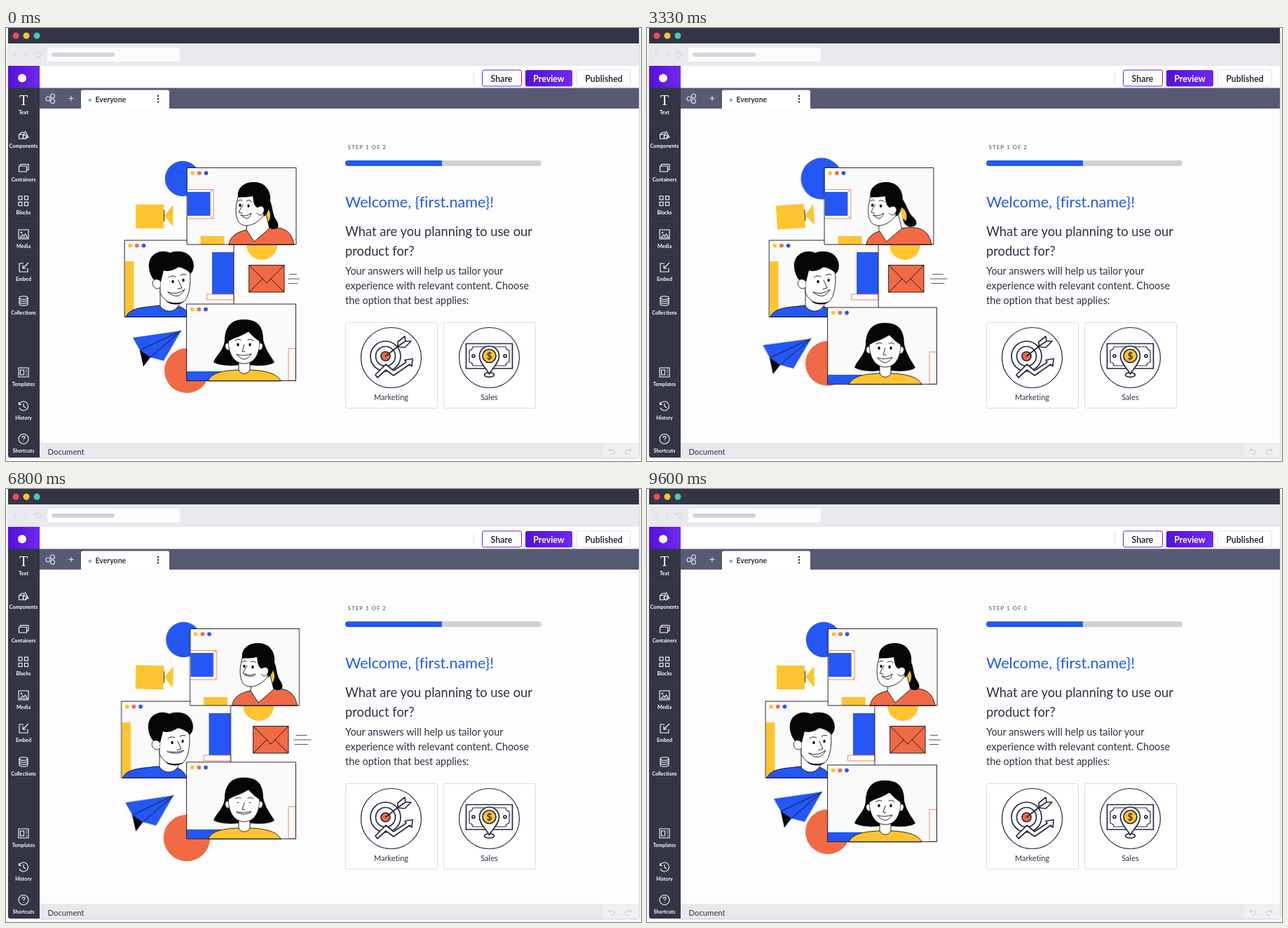
These frames come from a looping animation (906x618 px, 9660 ms). An HTML page:

```html
<!DOCTYPE html>
<html lang="en">
<head>
<meta charset="utf-8">
<title>Onboarding survey</title>
<style>
html, body { margin: 0; width: 100%; height: 100%; overflow: hidden; background: #fff; }
svg { display: block; width: 906px; height: 618px; font-family: Lato, sans-serif; font-variant-ligatures: none; fill: none; }
text { fill: #2f3142; }
.b { font-weight: 700; }
.mid { text-anchor: middle; }
.side text { fill: #fff; font-size: 7.2px; font-weight: 700; text-anchor: middle; }
.icon { stroke: #fff; stroke-width: 1.1; }
.k { stroke: #111; stroke-width: .9; stroke-linejoin: round; stroke-linecap: round; }
.w { fill: #fff; }
.blk { fill: #060608; }
.blue { fill: #2457f3; }
.yel { fill: #ffc42f; }
.red { fill: #f16a46; }
.thin { stroke: #f16a46; stroke-width: .8; }
.ink { stroke: #262a40; stroke-width: 1.7; stroke-linejoin: round; stroke-linecap: round; }

/* --u is the shared sway that drives the three windows and the red disc. */
@property --u { syntax: "<number>"; inherits: true; initial-value: 0; }
.sway, .move { animation: 4830ms cubic-bezier(.37, 0, .63, 1) infinite; }
.sway { animation-name: sway; }
#topWin { transform: translateX(calc(var(--u) * 1px)); }
#leftWin { transform: translateX(calc(var(--u) * -1px)); }
#lowWin { transform: translateY(calc(var(--u) * -.95px)); }
#redDot { transform: translateY(calc(var(--u) * 2px)); r: calc((32 + max(0, var(--u) - 2) * .5) * 1px); }
#hair { transform-box: fill-box; transform-origin: top; transform: scaleY(calc(1 + max(0, 0 - var(--u)) * .009)); }

#blueDot { animation-name: drift; }
#blueDot circle { animation: pulse 2415ms cubic-bezier(.37, 0, .63, 1) infinite; }
#yellowDot { animation-name: slide; }
#plane { animation-name: fly; }
#mail { animation-name: mail; }
#speed { animation-name: speed; transform-origin: 419px 358px; }
#speed path { vector-effect: non-scaling-stroke; }
#camera { animation-name: tilt; transform-origin: 211px 269px; }
#lady { animation-name: lady; }
#tail { animation-name: tail; transform-origin: 371px 242px; }
#man { animation-name: man; }
.mouth { animation-name: mouth; transform-box: fill-box; transform-origin: top; vector-effect: non-scaling-stroke; }
.eyes { animation-name: blink; transform-box: fill-box; transform-origin: center; }
#lowWin .eyes { animation-name: blink2; }

@keyframes sway { 0%, 3%, 100% { --u: 0; } 31% { --u: 6.2; } 69% { --u: -5.1; } 92% { --u: 1.4; } }
@keyframes drift { 0%, 100% { transform: translateX(252px); } 25% { transform: translateX(250.5px); } 56% { transform: translateX(256px); } 72% { transform: translateX(248.5px); } }
@keyframes pulse { 0%, 15%, 60%, 100% { r: 25.2px; } 40% { r: 29.7px; } }
@keyframes slide { 0%, 100% { transform: translateX(365px); } 26% { transform: translateX(369px); } 51% { transform: translateX(355.5px); } 75% { transform: translateX(370px); } }
@keyframes fly {
  0%, 100% { transform: translate(250px, 432px); }
  29% { transform: translate(238px, 436px) rotate(-1.5deg); }
  57% { transform: translate(241px, 439.5px) rotate(2deg); }
  76% { transform: translate(231.5px, 445px); }
}
@keyframes mail { 0%, 100% { transform: none; } 10% { transform: translateX(-1.5px); } 42% { transform: translateX(6px); } 61% { transform: translateX(-4.5px); } 80% { transform: translateX(2.2px); } }
@keyframes speed {
  0%, 100% { transform: translateX(0) scaleX(1); }
  22% { transform: translateX(2px) scaleX(1.3); }
  43% { transform: translateX(17px) scaleX(1.5); }
  65% { transform: translateX(8px) scaleX(1.5); }
  77% { transform: translateX(14.5px) scaleX(1.3); }
}
@keyframes tilt { 0%, 37%, 100% { transform: rotate(0deg); } 47% { transform: rotate(4.5deg); } 70% { transform: rotate(-4deg); } }
@keyframes lady { 0%, 10%, 100% { transform: translateX(0); } 42% { transform: translateX(1.5px); } 66% { transform: translateX(-7.5px); } }
@keyframes tail { 0%, 42%, 100% { transform: rotate(0deg); } 66% { transform: rotate(-13deg); } }
@keyframes man { 0%, 10%, 100% { transform: translateX(0); } 41% { transform: translateX(3.5px); } 62% { transform: translateX(1px); } }
@keyframes mouth { 0%, 12%, 60%, 100% { transform: scaleY(1); } 35%, 47% { transform: scaleY(.45); } }
@keyframes blink { 0%, 7%, 11.5%, 100% { transform: scaleY(1); } 8%, 10.5% { transform: scaleY(.25); } }
@keyframes blink2 { 0%, 7%, 11.5%, 39%, 43%, 100% { transform: scaleY(1); } 8%, 10.5%, 40%, 42% { transform: scaleY(.25); } }
</style>
</head>
<body>
<svg viewBox="0 0 906 618">
  <defs>
    <linearGradient id="violet" x2="1"><stop stop-color="#5410dc"/><stop offset="1" stop-color="#7029ee"/></linearGradient>
    <filter id="soft" x="-5%" y="-5%" width="110%" height="110%"><feGaussianBlur stdDeviation="1.6"/></filter>
    <g id="pane">
      <rect width="155.5" height="109.5" fill="#fafafa"/>
      <circle class="yel" cx="7.7" cy="7.6" r="2.9"/><circle class="red" cx="17.4" cy="7.6" r="2.9"/><circle class="blue" cx="27" cy="7.6" r="2.9"/>
    </g>
    <rect id="edge" class="k" width="155.5" height="109.5"/>
    <ellipse id="eye" class="blk" rx="1.7" ry="2.3"/>
    <rect id="block" width="5" height="5"/>
    <rect id="card" width="131" height="122" rx="2.5" fill="#fff" stroke="#dcdde0"/>
  </defs>

  <!-- browser and editor chrome -->
  <rect x="3" y="4" width="901" height="610" rx="4" fill="#c4c7cd" filter="url(#soft)"/>
  <rect x="3" width="900" height="613" rx="3" fill="#fdfdfd"/>
  <path d="M3 0H903V22H3Z" fill="#333545"/>
  <circle cx="14" cy="11" r="4.5" fill="#f4485c"/><circle cx="29" cy="11" r="4.5" fill="#ffc43a"/><circle cx="44" cy="11" r="4.5" fill="#4bc5bf"/>
  <path d="M3 22H903V54H3Z" fill="#e9eaee"/>
  <path d="M15 35l-3 3 3 3M27 35l3 3-3 3M42 36a4 4 0 1 1 1 5M41.500 34v3h3" stroke="#cfd1d8"/>
  <rect x="59" y="28" width="189" height="20" rx="2" fill="#fcfcfd"/>
  <rect x="65" y="35" width="90" height="6" rx="3" fill="#d3d5dc"/>
  <path d="M48 54H903V86H48Z" fill="#fff"/>
  <path d="M667.500 62V81" stroke="#e2e3e8"/>
  <rect x="679.500" y="60" width="56" height="23" rx="2.500" fill="#fff" stroke="#5f22dc"/>
  <rect x="741" y="60" width="67" height="23.500" rx="2.500" fill="url(#violet)"/>
  <rect x="814" y="60" width="77" height="23" rx="2.500" fill="#fff" stroke="#dcdde3"/>
  <g class="b mid" font-size="12.3">
    <text x="707" y="76.500">Share</text>
    <text x="774.500" y="76.500" style="fill:#fff">Preview</text>
    <text x="853" y="76.500">Published</text>
  </g>
  <path d="M48 85.500H903V115H48Z" fill="#575a73"/>
  <path d="M107 115V91q0-2.500 2.500-2.500H230.500q2.500 0 2.500 2.500V115Z" fill="#fff"/>
  <g stroke="#e7e8ee" stroke-width="1.1"><circle cx="60" cy="101" r="3"/><circle cx="66.500" cy="97" r="3"/><circle cx="66.500" cy="104.500" r="3"/><path d="M89.500 100.500h7M93 97v7"/></g>
  <circle cx="119.800" cy="103" r="2.200" fill="#5bbbe0"/>
  <text class="b" x="127.500" y="106" font-size="10.5">Everyone</text>
  <path d="M217 97v0M217 101.200v0M217 105.400v0" stroke="#222" stroke-width="2.4" stroke-linecap="round"/>
  <path d="M48 592H903V613H48Z" fill="#e7e9ec"/><path d="M852 592H903V613H852Z" fill="#eff0f2"/>
  <text x="59.500" y="609" font-size="11.3">Document</text>
  <path d="M860 602.500h5.500a3 3 0 0 1 0 6H862M862.500 600l-2.500 2.500 2.500 2.500M892 602.500h-5.500a3 3 0 0 0 0 6H890M889.500 600l2.500 2.500-2.500 2.500" stroke="#c8cbd1"/>

  <path d="M3 54H48V613H6q-3 0-3-3Z" fill="#333545"/>
  <path d="M3 54H48V85.500H3Z" fill="url(#violet)"/>
  <circle class="w" cx="23" cy="71.500" r="6"/>
  <path d="M5 133.500H46M5 276H46M5 323.500H46" stroke="#4a4c5d" stroke-dasharray="1 2"/>
  <g class="side">
    <text x="25" y="110" style="font:20px 'Liberation Serif',serif">T</text>
    <text x="25" y="123">Text</text><text x="25" y="171">Components</text><text x="25" y="219">Containers</text>
    <text x="25" y="266">Blocks</text><text x="25" y="314">Media</text><text x="25" y="361">Embed</text>
    <text x="25" y="409">Collections</text><text x="25" y="511">Templates</text><text x="25" y="559">History</text><text x="25" y="606">Shortcuts</text>
  </g>
  <g class="icon">
    <path d="M18.500 152h6v6h-6ZM27 147l5 9h-5M19 152l3-3h4v3"/><circle cx="27" cy="155.500" r="2.700"/>
    <path d="M18.500 197h11v8h-11ZM20.500 197v-2.500h11.500v8h-2.500"/>
    <use href="#block" x="18" y="240"/><use href="#block" x="26.500" y="240"/><use href="#block" x="18" y="248.500"/><use href="#block" x="26.500" y="248.500"/>
    <path d="M18 288h14v13h-14ZM20 299l3.500-4 2 2 2-3 3 5Z"/><circle cx="22" cy="292" r=".8"/>
    <path d="M25 336h-6v12h12v-5M32 335l-8 8M24 338.500v4.500h4.500"/>
    <ellipse cx="25" cy="385" rx="6" ry="2.300"/><path d="M19 385v9c0 3 12 3 12 0v-9M19 388c0 3 12 3 12 0M19 391c0 3 12 3 12 0"/>
    <path d="M18 485h14v13h-14ZM20.500 488h5v7h-5ZM28 488h2M28 491h2M28 495h2"/>
    <path d="M19 537a6.500 6.500 0 1 1 0 5M18.500 534v3.500h3.500M25 536v4l3 2"/>
    <circle cx="25" cy="586.500" r="7"/><path d="M23 585c0-3 4-3 4-.7 0 1.700-2 1.500-2 3.200M25 589.500v.8"/>
  </g>

  <!-- question panel -->
  <text class="b" x="487.500" y="173" font-size="8" letter-spacing="1" style="fill:#76798a">STEP 1 OF 2</text>
  <rect x="484" y="189" width="280" height="8" rx="4" fill="#cfd2d5"/>
  <path d="M488 189H622V197H488a4 4 0 0 1 0-8Z" fill="#245bec"/>
  <text x="484" y="255.500" font-size="21.6" style="fill:#245bec">Welcome, {first.name}!</text>
  <g font-size="18.3"><text x="484" y="296.500">What are you planning to use our</text><text x="484" y="324.500">product for?</text></g>
  <g font-size="14.4"><text x="484" y="352">Your answers will help us tailor your</text><text x="484" y="373">experience with relevant content. Choose</text><text x="484" y="394">the option that best applies:</text></g>
  <use href="#card" x="484.500" y="420.500"/><use href="#card" x="624.500" y="420.500"/>
  <g class="mid" font-size="11"><text x="549.500" y="531">Marketing</text><text x="689.500" y="531">Sales</text></g>
  <g class="ink">
    <circle class="w" cx="549.500" cy="470.500" r="43" stroke-width="1.200"/>
    <circle cx="541.500" cy="468.500" r="21.500"/><circle cx="541.500" cy="468.500" r="14"/>
    <circle class="red" cx="541.500" cy="468.500" r="6.500"/>
    <path class="w" d="M541.500 468.500 561 453M559 455v-7l10-8 1 7 8 0-9 9ZM561 453l9-6"/>
    <path class="w" d="M527 495l15-15 11 9 18-12-2-3 11-2-1 11-3-3-23 16-11-8-12 11Z"/>
    <circle class="w" cx="689.500" cy="470.500" r="43" stroke-width="1.200"/>
    <path class="w" d="M656.500 450.500H722.500V486H656.500Z"/>
    <path d="M666 455H713a5 5 0 0 0 5 5V477a5 5 0 0 0-5 5H666a5 5 0 0 0-5-5V460a5 5 0 0 0 5-5Z" stroke-width="1.200"/>
    <circle cx="667" cy="468" r="2"/><circle cx="712" cy="468" r="2"/>
    <ellipse class="w" cx="689.500" cy="495" rx="7" ry="3.200"/>
    <path class="w" d="M689.500 494C686 486 675.500 479 675.500 468a14 14 0 0 1 28 0c0 11-10.500 18-14 26Z"/>
    <circle class="yel" cx="689.500" cy="468" r="9.500"/>
  </g>
  <text class="b mid" x="689.500" y="473" font-size="14">$</text>

  <!-- illustration -->
  <g class="sway">
    <g id="blueDot" class="move"><circle class="blue" cy="215" r="25"/></g>
    <circle id="yellowDot" class="yel move" cy="309" r="22"/>
    <circle id="redDot" class="red" cx="258" cy="489"/>

    <g id="camera" class="move">
      <path class="yel" d="M185 252H225V286H185ZM226 268 238.500 252.500V283.500Z"/>
      <path class="k" d="M225.500 260V276" stroke-width=".7"/>
    </g>
    <g id="mail" class="move">
      <path class="red k" d="M347 338.500H397V377H347Z"/><path class="k" d="M347 338.500 372 364 397 338.500M347 377 366 358M397 377 378 358"/>
    </g>
    <g id="speed" class="move" stroke="#444" stroke-width=".9"><path d="M404 351.500H415"/><path d="M402 358H419"/><path d="M403 364.500H416"/></g>
    <g id="plane" class="move">
      <path class="blue" d="M0 0-69 10-59 28-54 51-44 38-25 43Z"/>
      <path class="blk" d="M-59 28-54 51-44 38Z"/>
      <path class="k" d="M-59 28 0 0-44 38" stroke-width=".5"/>
    </g>

    <g id="leftWin">
      <use href="#pane" x="169.500" y="303"/>
      <path class="yel" d="M170 333H182.500V412H170Z"/>
      <path class="blue" d="M294 320H325V380H294Z"/><path class="thin" d="M286.500 380H325V388H286.500Z"/>
      <path class="blue k" d="M171 412C178 398 197 399 219 396L246 397C255 400 260 405 262 412Z"/>
      <g id="man" class="move">
        <path class="w k" d="M220 372V397C228 408 244 406 248 392"/>
        <path class="w k" d="M220 340V378C226 393 247 399 256 388C263 378 264 360 262 342Z"/>
        <path class="blk" d="M214 363 209 357C201 344 202 328 213 322C221 317 230 319 234 321C243 317 259 318 265 329C270 338 268 347 263 351C260 346 254 343 246 341C238 347 230 348 225 346L221 362Z"/>
        <path class="w k" d="M220 361C213 355 207 361 210 368C213 373 218 373 220 370"/>
        <path class="blk" d="M228 390C236 396 248 396 254 390C247 393 238 393 228 390Z"/>
        <g class="eyes move"><use href="#eye" x="238" y="362"/><use href="#eye" x="253" y="360"/></g>
        <path class="k" d="M232 356Q237 352 242 355M249 353Q253 350 257 352M246 360 251 371 245 372.500"/>
        <path class="w k mouth move" d="M231 377Q244 382 255 373Q246 390 231 377Z"/>
      </g>
      <use href="#edge" x="169.500" y="303"/>
    </g>

    <g id="topWin">
      <use href="#pane" x="258.500" y="199.500"/>
      <path class="blue" d="M259 234H291.500V268H259Z"/>
      <path class="thin" d="M259 230.500H296V272H259M291.500 234 296 230.500M291.500 268 296 272"/>
      <path class="yel" d="M277.500 297H311.500V309H277.500Z"/>
      <path class="red k" d="M318 309C321 294 333 291 343 288L376 285C398 283 408 292 411 309Z"/>
      <g id="lady" class="move">
        <g id="tail" class="move">
          <path class="blk" d="M370 238C382 247 378 262 385 273C391 282 389 288 380 287C371 285 368 276 373 266Z"/>
          <path class="yel" d="M370 255C378 259 379 270 374 277C370 274 369 264 370 255Z"/>
        </g>
        <path class="w k" d="M344 280 343 288 354 305 376 286 370 262"/>
        <path class="w k" d="M333 236C326 254 327 269 332 277C340 287 358 281 367 268L368 246 352 234Z"/>
        <path class="blk" d="M331 242C329 226 342 219 356 220C371 221 379 234 377 248C376 259 372 267 368 269C368 260 362 260 358 256C353 253 353 246 352 240C345 242 337 241 331 242Z"/>
        <path class="w k" d="M359 256C366 251 371 258 367 264C364 269 360 267 358 264"/>
        <g class="eyes move"><use href="#eye" x="334" y="253"/><use href="#eye" x="346" y="254"/></g>
        <path class="k" d="M331 247Q334 244 337 246M343 247Q347 244 351 248M338 252 332 263 337 264.500"/>
        <path class="w k mouth move" d="M335 267Q343 270 350 264Q347 278 335 267Z"/>
      </g>
      <use href="#edge" x="258.500" y="199.500"/>
    </g>

    <g id="lowWin">
      <use href="#pane" x="258" y="394"/>
      <path class="blue" d="M258 490H307V503.500H258Z"/><path class="thin" d="M403 457.500H413.500V503H403Z"/>
      <path id="hair" class="blk" d="M340 416C319 415 312 430 312 446C310 461 301 465 296 477C308 484 330 482 340 480C352 482 375 484 383 477C377 467 370 459 367 445C367 427 360 416 340 416Z"/>
      <path class="yel k" d="M288 503.500C294 491 312 489 331 488H349C368 489 386 492 392 503.500Z"/>
      <path class="w k" d="M332 472V488C335 495 345 495 348 488V472"/>
      <path class="w k" d="M318 434C314 460 323 479 340 479C357 479 365 460 361 434Z"/>
      <path class="blk" d="M315 449C314 426 322 417 340 417C359 417 366 428 363 448C358 445 350 439 346 433C338 440 326 441 315 449Z"/>
      <path class="w k" d="M317 450C311 448 311 460 318 460M362 450C368 448 368 460 361 460"/>
      <g class="eyes move"><use href="#eye" x="331" y="452"/><use href="#eye" x="348" y="452"/></g>
      <path class="k" d="M327 446Q331 443 335 445M345 445Q349 443 353 446M340 452 337 461.500 341 462"/>
      <path class="w k mouth move" d="M329 466Q340 469 350 465Q341 480 329 466Z"/>
      <use href="#edge" x="258" y="394"/>
    </g>
  </g>
</svg>
</body>
</html>
```
